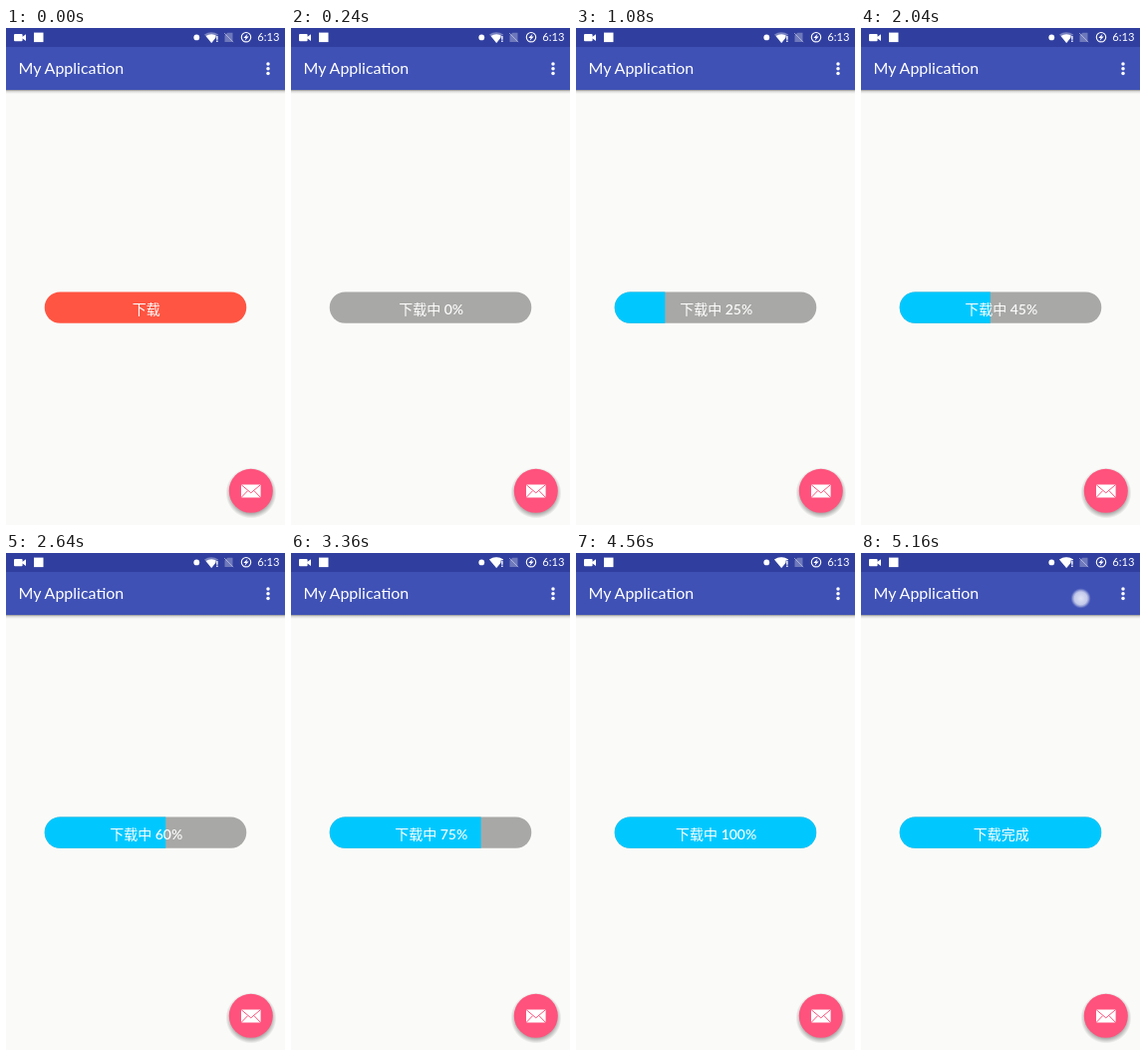
An HTML page that plays this animation: 280 px wide and 498 px high, repeating every 5280 ms.

```html
<!DOCTYPE html>
<html lang="zh-CN">
<head>
<meta charset="utf-8">
<title>Download button</title>
<style>
  html, body { margin: 0; width: 100%; height: 100%; overflow: hidden; background: #fafaf8; }
  svg { display: block; width: 280px; height: 498px; }
  text { font-family: Lato, "Noto Sans CJK SC", "Noto Sans CJK", sans-serif; fill: #fff; }
</style>
</head>
<body>
<svg viewBox="0 0 280 498">
  <defs>
    <linearGradient id="barShade" x1="0" y1="0" x2="0" y2="1">
      <stop offset="0" stop-color="#000" stop-opacity=".42"/>
      <stop offset=".4" stop-color="#000" stop-opacity=".12"/>
      <stop offset="1" stop-color="#000" stop-opacity="0"/>
    </linearGradient>
    <radialGradient id="fabShade">
      <stop offset=".8" stop-color="#000" stop-opacity=".3"/>
      <stop offset="1" stop-color="#000" stop-opacity="0"/>
    </radialGradient>
    <radialGradient id="glow">
      <stop offset="0" stop-color="#e0e3f5"/>
      <stop offset=".62" stop-color="#c3c9ea"/>
      <stop offset=".78" stop-color="#a3acdc" stop-opacity=".8"/>
      <stop offset="1" stop-color="#6f7fca" stop-opacity="0"/>
    </radialGradient>
    <clipPath id="pill"><rect x="38.7" y="264.5" width="202.6" height="31.2" rx="15.6"/></clipPath>
  </defs>

  <rect width="280" height="498" fill="#fafaf8"/>
  <rect y="62" width="280" height="4" fill="url(#barShade)"/>
  <rect y="19" width="280" height="43" fill="#3f51b5"/>
  <rect width="280" height="19" fill="#303f9f"/>

  <!-- status bar -->
  <g fill="#fff">
    <path d="M9 6h6.6q1 0 1 1v1.7l3.4-2.5v6.8l-3.4-2.5v1.7q0 1-1 1H9q-1 0-1-1V7q0-1 1-1z"/>
    <rect x="28" y="4.6" width="9.5" height="9.5"/>
    <circle cx="191.3" cy="9.4" r="2.9"/>
    <path id="fan" d="M199 6.6Q206 1.9 213.2 6.6L206.2 15z" opacity=".35"/>
    <path id="level"/>
    <path d="M210.6 7.4h2.4v7.2h-2.4z" fill="#303f9f"/>
    <path d="M211.2 8h1.4v3.8h-1.4zM211.2 12.6h1.4v1.4h-1.4z"/>
    <path d="M222.3 4.8h5.2v9.2h-8V7.6z" opacity=".3"/>
    <path d="M219 5l9 9.2" stroke="#fff" opacity=".45"/>
    <circle cx="241" cy="9.2" r="4.7" fill="none" stroke="#fff" stroke-width="1.1"/>
    <path d="M242.5 5.7l-4.2 4.2h2.3l-1.1 3 4.2-4.3h-2.4z"/>
    <text x="252.3" y="13.4" font-size="11.2">6:13</text>
  </g>

  <!-- app bar -->
  <text x="12.5" y="46.4" font-size="16">My Application</text>
  <g fill="#fff">
    <circle cx="263" cy="36" r="1.75"/>
    <circle cx="263" cy="40.8" r="1.75"/>
    <circle cx="263" cy="45.6" r="1.75"/>
  </g>

  <!-- progress button -->
  <g clip-path="url(#pill)">
    <rect id="base" x="38" y="264" width="204" height="33"/>
    <rect id="fill" x="38" y="264" height="33" fill="#00c8ff"/>
  </g>
  <text id="label" x="140.7" y="286.7" font-size="14" font-weight="500" text-anchor="middle"></text>

  <!-- mail button -->
  <circle cx="246" cy="466" r="25.5" fill="url(#fabShade)"/>
  <circle cx="245.8" cy="463.8" r="22" fill="#ff527c"/>
  <rect x="236" y="457.4" width="19.6" height="13" rx=".8" fill="#fff"/>
  <path d="M236.3 457.8l9.5 8 9.5-8M236.3 470.2l6.3-6.5M255.3 470.2l-6.3-6.5" fill="none" stroke="#ff527c" stroke-width="1"/>

  <circle id="touch" cx="220.6" cy="45.4" r="10.3" fill="url(#glow)"/>
</svg>
<script>
  const LOOP = 5280, START = 120, DONE = 4800, TOUCH = 5160, WIFI = 3240;
  // moments at which progress gains another 5%
  const TICKS = [360, 480, 600, 840, 1080, 1320, 1560, 1800, 2040, 2280,
                 2520, 2640, 3000, 3240, 3360, 3720, 3840, 4080, 4320, 4560];
  const el = id => document.getElementById(id);
  const set = (id, name, value) => el(id).setAttribute(name, value);

  function labelAt(t, percent) {
    if (t < START) return "下载";
    return t < DONE ? `下载中 ${percent}%` : "下载完成";
  }

  function draw(t) {
    const percent = 5 * TICKS.filter(tick => tick <= t).length;
    set("base", "fill", t < START ? "#ff5542" : "#a8a8a6");
    set("fill", "width", percent ? 0.7 + 202.6 * percent / 100 : 0);
    const label = labelAt(t, percent);
    if (el("label").textContent !== label) el("label").textContent = label;
    set("level", "d", t < WIFI
      ? "M200.6 8Q206.2 4.3 211.8 8L206.2 15z"
      : "M199 6.6Q206 1.9 213.2 6.6L206.2 15z");
    set("touch", "visibility", t < TOUCH ? "hidden" : "visible");
  }

  const began = performance.now();
  function frame() {
    draw((performance.now() - began) % LOOP);
    requestAnimationFrame(frame);
  }
  draw(0);
  requestAnimationFrame(frame);
</script>
</body>
</html>
```
